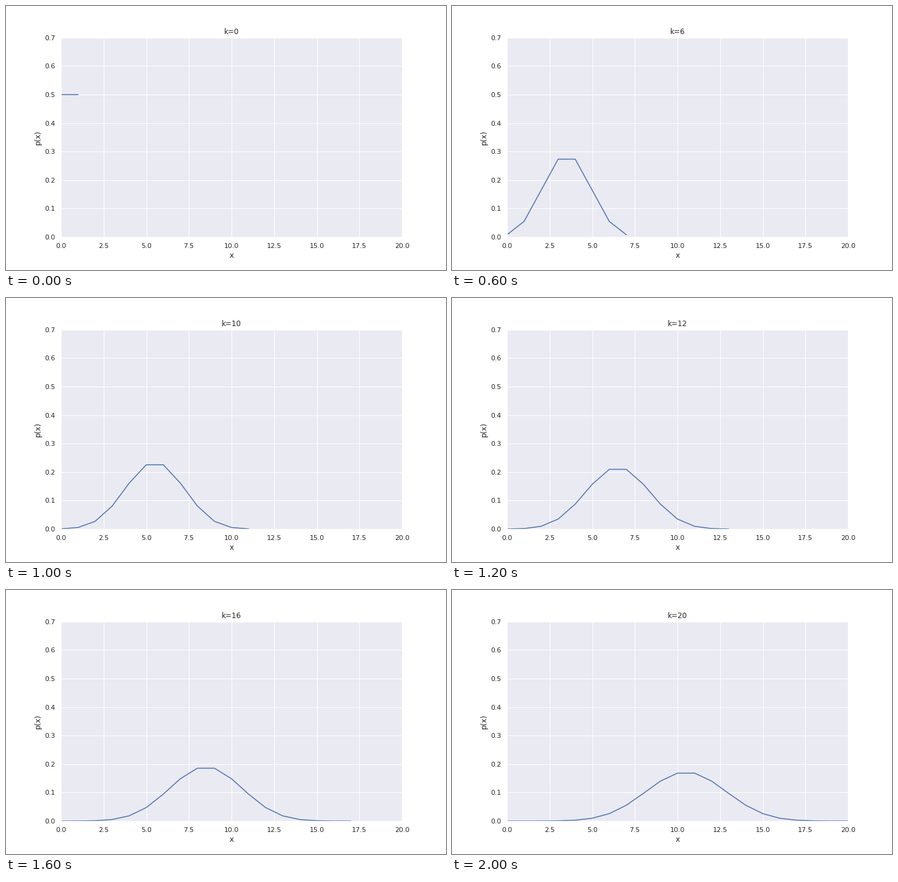
A matplotlib script for the animation above (2100 ms loop, 720 px wide and 432 px high).

```python
from math import comb

import matplotlib.pyplot as plt
from matplotlib.animation import FuncAnimation

STEPS = 21
INK = "#262626"

plt.rcParams.update({
    "font.family": "DejaVu Sans",
    "font.size": 12,
    "text.color": INK,
    "axes.facecolor": "#EAEAF2",
    "axes.edgecolor": "white",
    "axes.linewidth": 1.25,
    "axes.labelcolor": INK,
    "axes.labelsize": 12,
    "axes.titlesize": 12,
    "axes.axisbelow": True,
    "axes.grid": True,
    "grid.color": "white",
    "grid.linewidth": 1,
    "lines.solid_capstyle": "round",
    "xtick.bottom": False,
    "ytick.left": False,
})
for axis in ("xtick", "ytick"):
    plt.rcParams.update({
        f"{axis}.color": INK,
        f"{axis}.labelsize": 11,
        f"{axis}.major.size": 6,
    })

fig, ax = plt.subplots(figsize=(10, 6), dpi=72, facecolor="white")
fig.subplots_adjust(left=0.125, right=0.9, bottom=0.125, top=0.88)
ax.set(xlim=(0, 20), ylim=(0, 0.7), xlabel="x", ylabel="p(x)")
line, = ax.plot([], [], color="#4C72B0", lw=1.5)
title = ax.set_title("k=0")


def update(k):
    """Show the fair-coin binomial distribution of k + 1 tosses."""
    n = k + 1
    x = range(n + 1)
    line.set_data(x, [comb(n, i) / 2**n for i in x])
    title.set_text(f"k={k}")
    return line, title


anim = FuncAnimation(fig, update, frames=STEPS, interval=100,
                     repeat=True, repeat_delay=0, blit=False)
plt.show()
```
